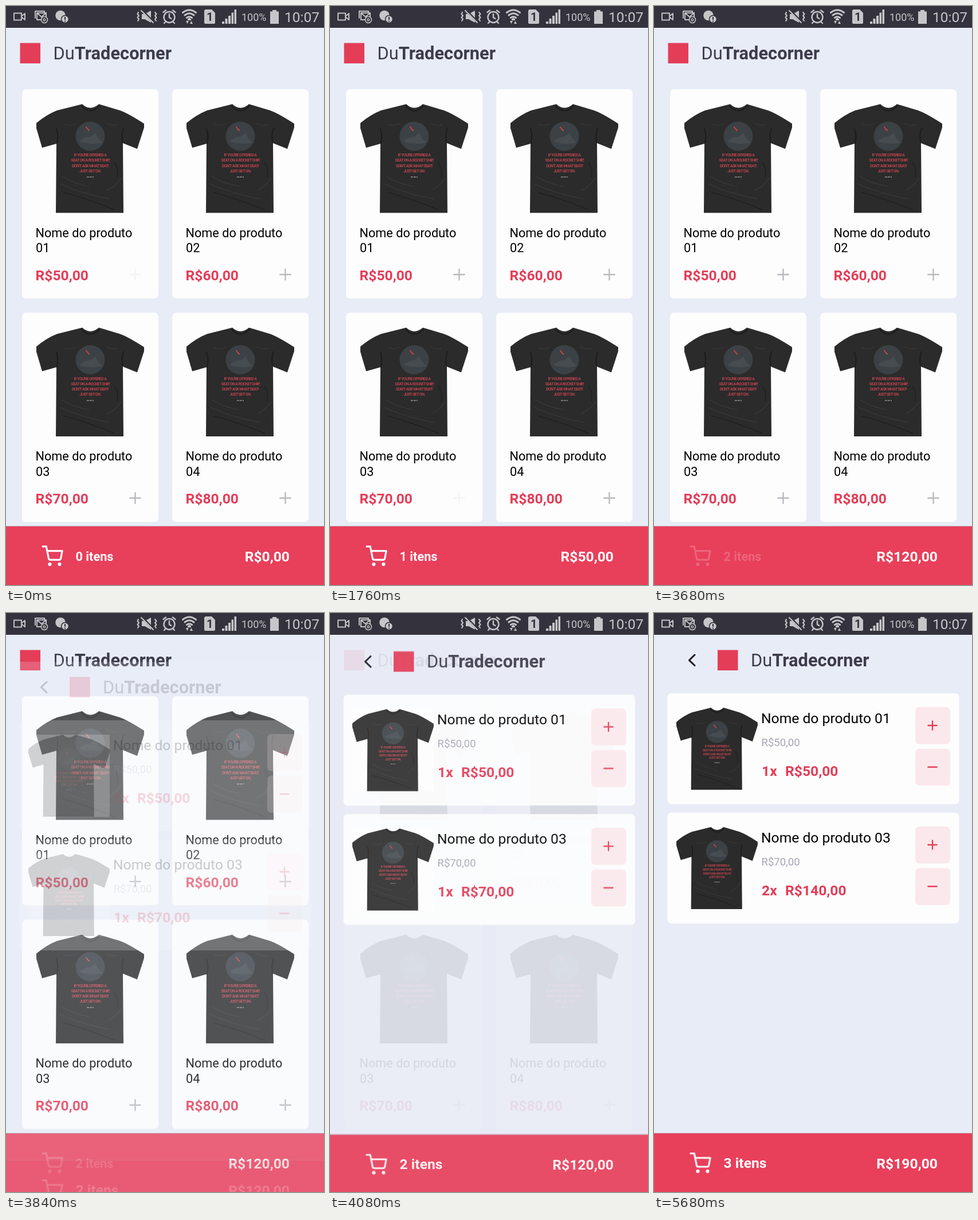
An HTML page for the animation above (5.76 s loop, 555 by 1009 pixels).

```html
<!DOCTYPE html>
<html lang="pt">
<head>
<meta charset="utf-8">
<title>DuTradecorner</title>
<style>
  html, body { margin: 0; width: 100%; height: 100%; overflow: hidden; background: #e8ecf6; }
  svg { display: block; width: 555px; height: 1009px; font-family: Roboto, sans-serif; }
  .line { fill: none; stroke-linecap: round; stroke-linejoin: round; }
  .b { font-weight: 700; }
  .red { fill: #e43d58; }
  .title { font-size: 30.8px; fill: #3d3c4c; }
  .t16 { font-size: 24.67px; }
  .t14 { font-size: 21.7px; }
  .t12 { font-size: 18.5px; fill: #a6a6b4; }
  .print { font-size: 7px; letter-spacing: -.6px; font-weight: 500; fill: #cf4651; text-anchor: middle; }

  .add1, .add3, .open, .more, .page, .in, [class^="show"] {
    animation: 5760ms step-end infinite;
  }
  .add1 { animation-name: add1; }
  .add3 { animation-name: add3; }
  .open { animation-name: open; }
  .more { animation-name: more; }
  .page { animation-name: rise; }
  .in { animation-name: appear; }
  .show0 { animation-name: show0; }
  .show1 { animation-name: show1; }
  .show2 { animation-name: show2; }
  .showOld { animation-name: showOld; }
  .showNew { animation-name: showNew; }

  /* pressed buttons fade and recover on release */
  @keyframes add1 {
    0% { opacity: .13 } 20.83% { opacity: .46 } 22.22% { opacity: .73 } 23.61% { opacity: 1 }
  }
  @keyframes add3 {
    0% { opacity: 1 } 30.55% { opacity: .13 } 40.27% { opacity: .73 } 41.66% { opacity: 1 }
  }
  @keyframes open {
    0% { opacity: 1 } 55.55% { opacity: .2 }
  }
  @keyframes more {
    0% { opacity: 1 } 84.72% { opacity: .2 }
    90.27% { opacity: .46 } 91.66% { opacity: .73 } 93.05% { opacity: 1 }
  }

  /* the cart page fades in from below */
  @keyframes rise {
    0% { transform: translateY(78px) }
    66.66% { transform: translateY(47px) }
    68.05% { transform: translateY(20.8px) }
    69.44% { transform: translateY(7.8px) }
    70.83% { transform: translateY(2.4px) }
    72.22% { transform: none }
  }
  @keyframes appear {
    0% { opacity: 0 } 66.66% { opacity: .197 } 68.05% { opacity: .512 }
    69.44% { opacity: .7 } 70.83% { opacity: .91 } 72.22% { opacity: 1 }
  }

  /* counters */
  @keyframes show0 { 0% { visibility: visible } 15.27% { visibility: hidden } }
  @keyframes show1 {
    0% { visibility: hidden } 15.27% { visibility: visible } 37.5% { visibility: hidden }
  }
  @keyframes show2 { 0% { visibility: hidden } 37.5% { visibility: visible } }
  @keyframes showOld { 0% { visibility: visible } 88.88% { visibility: hidden } }
  @keyframes showNew { 0% { visibility: hidden } 88.88% { visibility: visible } }
</style>
</head>
<body>
<svg viewBox="0 0 555 1009" xmlns="http://www.w3.org/2000/svg">
  <defs>
    <g id="shirt">
      <path fill="#fdfdfd" d="M0 0H188V190H0Z"/>
      <path fill="#2b2b2b" d="M80 0Q94 13 109 0L116 2L146 11Q160 16 188 34V41L176 78L151 68L152 189.500H34L35 69L10 76L0 42V33Q18 18 36 11L72 2Z"/>
      <path class="line" stroke="#1c1c1c" stroke-width="2" d="M79 3Q94 20 110 3M36 69Q39 54 35 43M150 66Q148 52 152 42"/>
      <path class="line" stroke="#363636" stroke-width="1.500" d="M42 139Q78 156 128 165M45 126Q66 139 92 143M124 150Q139 143 148 129M48 35Q60 39 69 34M122 33Q132 39 142 36"/>
      <path class="line" stroke="#202020" stroke-width="1.500" d="M48 154Q90 165 136 184M136 101Q144 112 141 128"/>
      <circle cx="94" cy="56" r="25.500" fill="#3b4145"/>
      <path fill="#464c50" d="M75 65Q85 56 94 57L103 50L108 60L116 67Q95 72 75 65Z"/>
      <path class="line" stroke="#d4404c" stroke-width="2" d="M87 40L90 44L92 46"/>
      <g class="print">
        <text x="94" y="91">IF YOU'RE OFFERED A</text>
        <text x="94" y="100">SEAT ON A ROCKET SHIP,</text>
        <text x="94" y="109.500">DON'T ASK WHAT SEAT!</text>
        <text x="94" y="118.500">JUST GET ON.</text>
      </g>
      <path stroke="#929292" stroke-width="1.500" stroke-dasharray="4 1" d="M88 127H100"/>
    </g>
    <g id="trolley" class="line" stroke="#fff" stroke-width="2" transform="translate(62.500 940.300) scale(1.550)">
      <circle cx="9" cy="21" r="1"/>
      <circle cx="20" cy="21" r="1"/>
      <path d="M1 1h4l2.680 13.390a2 2 0 0 0 2 1.610h9.720a2 2 0 0 0 2-1.610L23 6H6"/>
    </g>
  </defs>

  <rect width="555" height="1009" fill="#e8ecf6"/>
  <g id="list"></g>
  <g id="cart" class="page"></g>

  <g id="status" fill="#c6c6ca">
    <rect width="555" height="38" fill="#34333d"/>
    <g class="line" stroke="#c0c0c4" stroke-width="2">
      <path d="M14 12.500H27V24.500H14ZM28 17L33 13V24L28 20"/>
      <path d="M51 21V9H67V12M54 12H70V19M54 12V24H61M54 12L62 19L70 12"/>
      <circle cx="67" cy="24" r="5.500" stroke-width="1.600"/>
      <circle cx="67" cy="24" r="1.800" stroke-width="1.400"/>
    </g>
    <circle cx="95" cy="16.500" r="8.700"/>
    <circle cx="103" cy="23" r="6.500" stroke="#34333d" stroke-width="1.500"/>
    <path stroke="#34333d" stroke-width="2" d="M103 19V24M103 25.500V27.500"/>

    <path d="M237 14H242L253 8V29L242 23H237Z"/>
    <path class="line" stroke="#34333d" stroke-width="4" d="M238 8L258 29"/>
    <path class="line" stroke="#c6c6ca" stroke-width="2" d="M236 8L257 29M231 11L229.500 14L232 17L229.500 20L232 23L230 26M260 11L262.500 14L260 17L262.500 20L260 23L262 26"/>

    <g class="line" stroke="#c6c6ca" stroke-width="2.400">
      <circle cx="285" cy="19.500" r="9.500"/>
      <path d="M285 14V20L288.500 22M274.500 11L279 7.500M295.500 11L291 7.500M278 28L276 30M292 28L294 30"/>
    </g>
    <g class="line" stroke="#c6c6ca" stroke-width="3">
      <path d="M308.500 11.500Q320 2.500 331.500 11.500M312 16Q320 9.500 328 16M315.500 20.500Q320 17 324.500 20.500"/>
    </g>
    <path d="M317 23L320 20L323 23V25H317ZM314 26H319L316.500 31ZM321 31H326L323.500 26Z"/>

    <path d="M349 6H359L365 12V29Q365 31 363 31H348Q346 31 346 29V9Q346 6 349 6Z"/>
    <text x="350" y="26" class="b" font-size="20" fill="#34333d">1</text>
    <path d="M377 27H381V31H377ZM382.500 22H386.500V31H382.500ZM388 17H392V31H388ZM393.500 11.500H397V31H393.500ZM398.500 6H402V31H398.500Z"/>
    <text x="411" y="26" font-size="18">100%</text>
    <path d="M465 7H472V9.500H476V31H461V9.500H465Z"/>
    <text x="486" y="28" font-size="24.500">10:07</text>
  </g>
</svg>
<script>
  const text = (x, y, cls, str, extra = '') => `<text x="${x}" y="${y}" class="${cls}" ${extra}>${str}</text>`;
  const box = (x, y, w, h, fill, cls = '') =>
    `<rect x="${x}" y="${y}" width="${w}" height="${h}" rx="7" fill="${fill}" class="${cls}"/>`;
  const sign = (x, y, r, color, plus, cls = '') =>
    `<path class="line ${cls}" stroke="${color}" stroke-width="2.3" d="M${x - r} ${y}h${2 * r}${plus ? `M${x} ${y - r}v${2 * r}` : ''}"/>`;
  const group = (cls, body) => `<g class="${cls}">${body}</g>`;
  const money = n => `R$${n},00`;

  const header = (x, cls) =>
    `<rect x="${x}" y="64.5" width="35.5" height="35.5" fill="#e43d58" class="${cls}"/>` +
    text(x + 58, 93, `title ${cls}`, 'Du<tspan class="b">Tradecorner</tspan>');

  const footer = cls =>
    `<rect y="906" width="555" height="1" fill="#b9a7b5" class="${cls}"/>` +
    `<rect y="907" width="555" height="102" fill="#e83f5b" class="${cls}"/>`;
  const total = (n, cls) => text(495, 968, `t16 b ${cls}`, money(n), 'fill="#fff" text-anchor="end"');
  const items = (n, cls) => text(121.5, 967, `b ${cls}`, `${n} itens`, 'fill="#fff"');

  const product = i => {
    const x = 28 + (i % 2) * 262, y = 145 + (i >> 1) * 389.5;
    return box(x, y, 238, 364.5, '#fdfdfd') +
      `<use href="#shirt" x="${x + 25}" y="${y + 26}"/>` +
      text(x + 23.5, y + 257.5, 't14', 'Nome do produto') +
      text(x + 24, y + 284, 't14', `0${i + 1}`) +
      text(x + 23.5, y + 332.5, 't16 b red', money(50 + i * 10)) +
      group(`add${i + 1}`, sign(x + 197.5, y + 323, 9.3, '#b9b9bd', true));
  };

  document.getElementById('list').innerHTML =
    header(24.5, '') + [0, 1, 2, 3].map(product).join('') + footer('') +
    group('open', '<use href="#trolley"/>' +
      [0, 1, 2].map(n => group(`show${n}`, items(n, 't14'))).join('')) +
    [0, 50, 120].map((n, i) => group(`show${i}`, total(n, ''))).join('');

  const amount = (y, count, price) =>
    text(188, y + 144, 't16 b red in', `${count}x`) +
    text(229, y + 144, 't16 b red in', money(price * count));

  const button = (y, plus) =>
    box(456, y, 61, 64.5, '#fbe8ec', 'in') + sign(486, y + 32, 7.7, '#e43d58', plus, 'in');

  const row = (y, id, price, changes) =>
    box(23.5, y, 509, 193, '#fdfdfd', 'in') +
    `<g transform="translate(39 ${y + 25}) scale(.755)"><use href="#shirt" class="in"/></g>` +
    text(187, y + 51.5, 't16 in', `Nome do produto 0${id}`) +
    text(187.5, y + 91.5, 't12 in', money(price)) +
    (changes
      ? group('showOld', amount(y, 1, price)) + group('showNew', amount(y, 2, price))
      : amount(y, 1, price)) +
    group(changes ? 'more' : '', button(y + 24, true)) + button(y + 96.5, false);

  document.getElementById('cart').innerHTML =
    '<rect y="38" width="555" height="971" fill="#e8ecf6" class="in"/>' +
    '<path class="line in" stroke="#17171d" stroke-width="3" d="M71 73L61.5 82.3L71 91.5"/>' +
    header(111, 'in') + row(140, 1, 50, false) + row(348, 3, 70, true) + footer('in') +
    '<use href="#trolley" class="in"/>' +
    group('showOld', items(2, 't16 in') + total(120, 'in')) +
    group('showNew', items(3, 't16 in') + total(190, 'in'));
</script>
</body>
</html>
```
